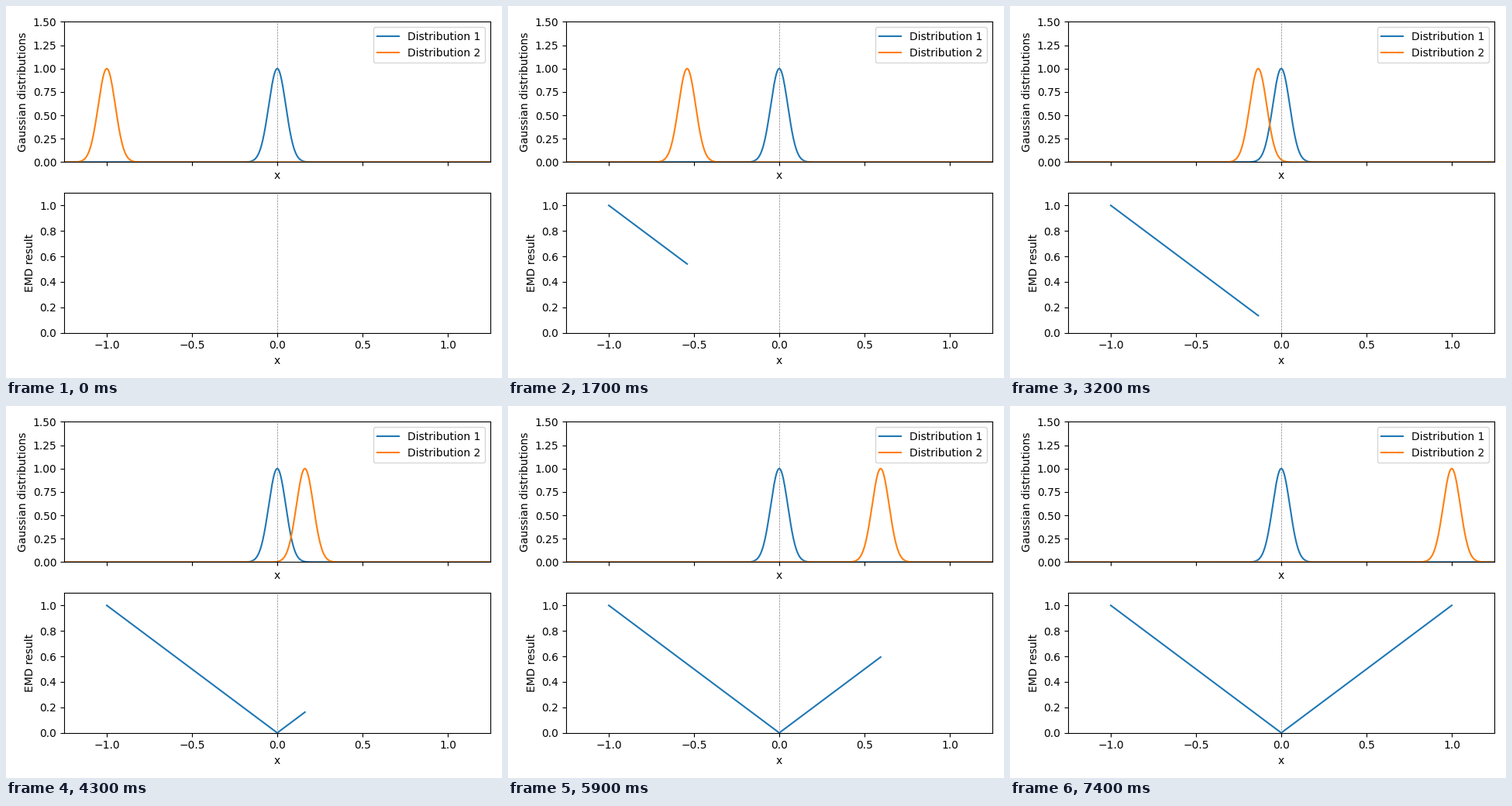
A matplotlib script that plays this animation: 640x480 px, repeating every 7500 ms.

```python
import numpy as np
import matplotlib.pyplot as plt
from matplotlib.animation import FuncAnimation

FRAMES = 75
SIGMA = 0.05

x = np.linspace(-1.25, 1.25, 1001)
shifts = np.linspace(-1, 1, FRAMES)
emd = np.abs(shifts)


def gaussian(mean):
    return np.exp(-0.5 * ((x - mean) / SIGMA) ** 2)


fig, (top, bottom) = plt.subplots(2, 1, sharex=True, figsize=(6.4, 4.8), dpi=100)

top.plot(x, gaussian(0), label="Distribution 1")
moving, = top.plot(x, gaussian(shifts[0]), label="Distribution 2")
trace, = bottom.plot([], [])

top.set(xlim=(-1.25, 1.25), ylim=(0, 1.5), xlabel="x",
        ylabel="Gaussian distributions")
bottom.set(ylim=(0, 1.1), xlabel="x", ylabel="EMD result")
for ax in (top, bottom):
    ax.axvline(0, color="gray", linestyle="--", linewidth=0.5)
top.legend(loc="upper right")
fig.tight_layout()


def update(i):
    moving.set_ydata(gaussian(shifts[i]))
    trace.set_data(shifts[:i + 1], emd[:i + 1])
    return moving, trace


anim = FuncAnimation(fig, update, frames=FRAMES, interval=100,
                     repeat=True, repeat_delay=0)
plt.show()
```
